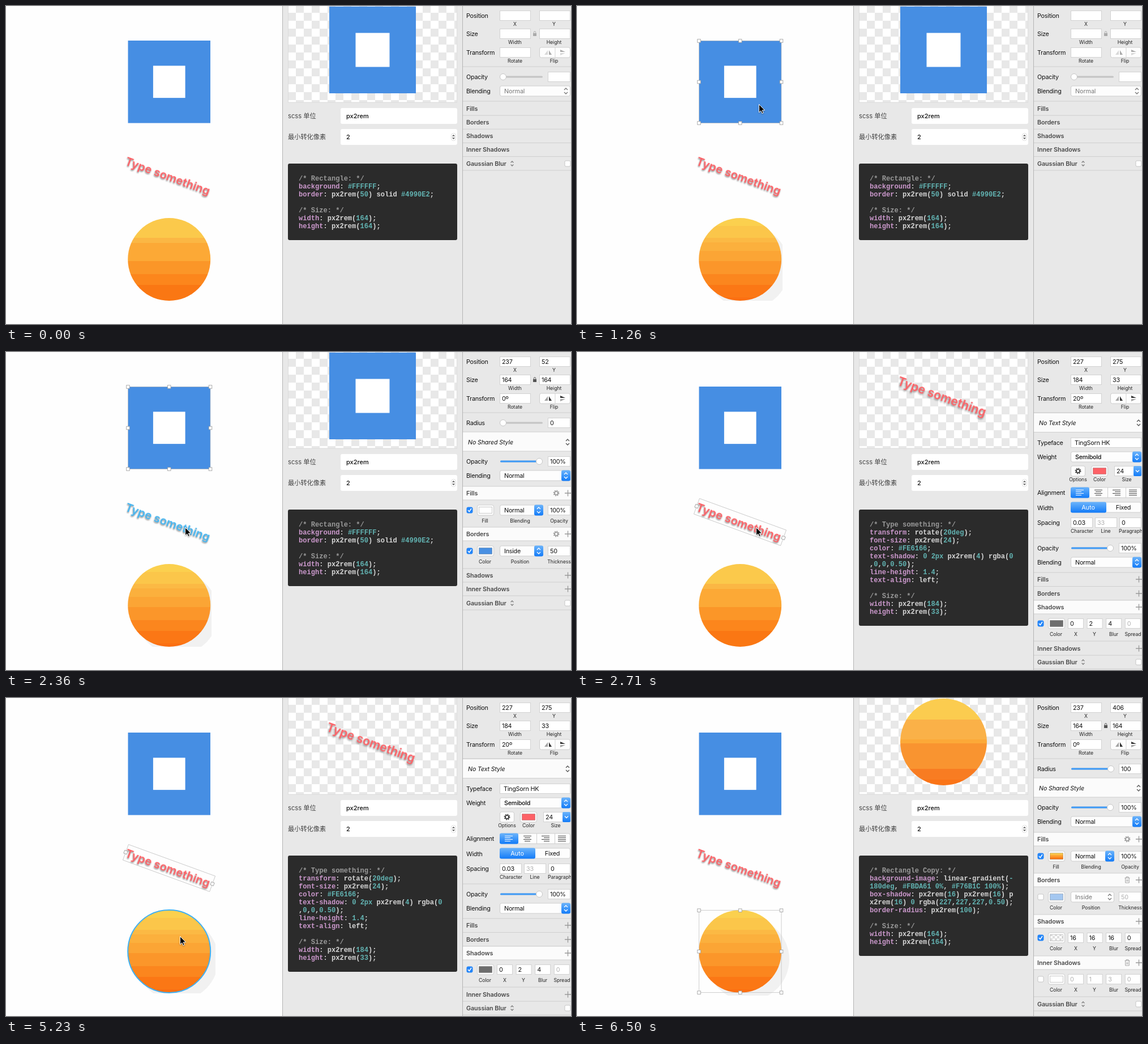
These frames come from a looping animation (998 px wide and 561 px high, 7.41 s). An HTML page:

```html
<!DOCTYPE html>
<html lang="en">
<head>
<meta charset="utf-8">
<title>Style inspector</title>
<style>
html, body { margin: 0; width: 100%; height: 100%; overflow: hidden; background: #fefefe; }
svg { display: block; }
text { font-family: Inter, "Noto Sans CJK SC", "Noto Sans CJK", sans-serif; white-space: pre; }
.l { font-size: 10.8px; letter-spacing: -.25px; fill: #111; }
.s { font-size: 8.7px; letter-spacing: -.05px; fill: #222; text-anchor: middle; }
.b { font-size: 10.8px; letter-spacing: -.1px; font-weight: 600; fill: #4a4a4a; }
.i { font-size: 10.6px; letter-spacing: -.1px; font-style: italic; fill: #111; }
.d { font-size: 10.8px; letter-spacing: -.25px; fill: #b0b0b0; }
.g { font-size: 10.8px; letter-spacing: -.1px; fill: #777; }
.w { font-size: 10.8px; fill: #fff; text-anchor: middle; }
.c { font-size: 10.8px; letter-spacing: -.2px; fill: #111; text-anchor: middle; }
.m { font-size: 11.2px; fill: #444; }
.v { font-size: 11px; font-weight: 500; fill: #111; }
.code { font: bold 12.07px "Liberation Mono", monospace; fill: #d6d6d6; }
.sample { font-size: 20.3px; font-weight: 600; filter: drop-shadow(0 2px 1.3px rgba(0,0,0,.45)); }
</style>
</head>
<body>
<svg id="stage" width="998" height="561" viewBox="0 0 998 561"></svg>
<script>
const LOOP = 7410;
const stage = document.getElementById('stage');
const layers = [];

// Drawing helpers: each returns SVG markup
const rect = (x, y, w, h, fill, more = '') =>
  `<rect x="${x}" y="${y}" width="${w}" height="${h}" fill="${fill}" ${more}/>`;
const path = (d, color, width = 1, more = '') =>
  `<path d="${d}" fill="none" stroke="${color}" stroke-width="${width}" ${more}/>`;
const text = (x, y, s, cls = 'l') => `<text class="${cls}" x="${x}" y="${y}" dy=".36em">${s}</text>`;
const line = y => rect(807, y - .5, 191, 1, '#cfcfcf');
const whiteRow = (y, h) => rect(807, y, 191, h, '#fbfbfb') + line(y) + line(y + h);
const bands = (id, top, bottom, stops) => {
  const marks = stops.map(([y, color], i) => {
    const end = i + 1 < stops.length ? stops[i + 1][0] : bottom;
    return [y, end].map(v => `<stop offset="${(v - top) / (bottom - top)}" stop-color="${color}"/>`).join('');
  });
  return `<linearGradient id="${id}" x2="0" y2="1">${marks.join('')}</linearGradient>`;
};

// Panel controls, positioned by vertical centre
const field = (x, y, w, s = '', cls = 'l') =>
  rect(x + .5, y - 8.5, w - 1, 17, '#fff', 'stroke="#d2d2d2"') + text(x + 4, y, s, cls);
const arrows = (x, y, color, k = 1) =>
  path(`M${x - 3 * k} ${y - 2 * k}l${3 * k} ${-3 * k} ${3 * k} ${3 * k}M${x - 3 * k} ${y + 2 * k}l${3 * k} ${3 * k} ${3 * k} ${-3 * k}`, color, 1.3);
const button = (x, y, w) => rect(x + .5, y - 9, w - 1, 18, '#fdfdfd', 'rx="3" stroke="#cdcdcd"');
const popup = (x, y, w, s, on = true) => button(x, y, w) + text(x + 8, y, s, on ? 'l' : 'g') +
  (on ? rect(x + w - 16, y - 9.5, 16, 19, 'url(#blue)', 'rx="3"') : '') +
  arrows(x + w - 8, y, on ? '#fff' : '#777');
const slider = (y, knob, on) => rect(873, y - 1.5, 75, 3, '#c4c4c4', 'rx="1.5"') +
  (on ? rect(873, y - 1.5, knob - 873, 3, '#3f9bf8', 'rx="1.5"') : '') +
  `<circle cx="${knob}" cy="${y}" r="5.5" fill="#fff" stroke="#c6c6c6"/>`;
const check = (x, y, on) => rect(x - 5, y - 5, 10, 10, on ? '#2385f8' : '#fff', `rx="2" stroke="${on ? '#2385f8' : '#c6c6c6'}"`) +
  (on ? path(`M${x - 3} ${y}l2.3 2.6L${x + 3} ${y - 3}`, '#fff', 1.5) : '');
const swatch = (y, fill, x = 832) => button(x, y, 30) + rect(x + 3.5, y - 5.5, 23, 11, fill, 'stroke="#0003"');
const gear = (x, y, color) => `<g fill="none" stroke="${color}"><circle cx="${x}" cy="${y}" r="3" stroke-width="1.7"/>
  <circle cx="${x}" cy="${y}" r="4.6" stroke-width="1.7" stroke-dasharray="1.8 1.81"/></g>`;
const plus = y => path(`M987 ${y}h11M992.5 ${y - 5.5}v11`, '#999', 1.3);
const trash = y => path(`M967.5 ${y - 3.5}h9M970 ${y - 4}v-1.5h4V${y - 4}M968.7 ${y - 3}v8h6.6v-8M971 ${y - 1}v4M973 ${y - 1}v4`, '#a5a5a5');
const title = (y, s, icons = '', active = false) =>
  (active ? whiteRow(y - 12, 24) : line(y + 12)) + text(813, y, s, 'b') + icons;
const blur = y => title(y, 'Gaussian Blur', arrows(894, y, '#777', .8) + check(992, y, false));
const opacity = (y, on = true) => text(813, y, 'Opacity') + slider(y, on ? 942 : 878, on) + field(957, y, 40, on ? '100%' : '');
const blending = (y, on = true) => text(813, y, 'Blending') + popup(872, y, 125, 'Normal', on);
const labels = (y, names, xs) => names.map((s, i) => text(xs[i], y, s, 's')).join('');
const shadowRow = (y, fill, values, on) => check(819, y, on) + swatch(y, fill) +
  values.map((v, i) => field(867 + 33.6 * i, y, 28, v, !on || v === '0' && i === 3 && fill === '#6e6e6e' ? 'd' : 'l')).join('') +
  labels(y + 18.5, ['Color', 'X', 'Y', 'Blur', 'Spread'], [846, 881, 914, 948, 982]);
const paintRow = (y, fill, mode, amount, names, on = true) => check(819, y, on) + swatch(y, fill) +
  popup(872, y, 77, mode, on) + field(957, y, 40, amount, on ? 'l' : 'd') + labels(y + 18.5, names, [846, 908, 977]);

function header(values = ['', '', '', '', ''], lock = '#555') {
  const [x, y, w, h, angle] = values, flip = angle ? '#333' : '#aaa';
  return text(813, 17, 'Position') + field(872, 17, 55, x) + field(942, 17, 55, y) +
    text(813, 49, 'Size') + field(872, 49, 55, w) + field(942, 49, 55, h) +
    (lock ? rect(931, 48, 6, 5, lock) + path('M932.3 48v-1.5a1.7 1.7 0 0 1 3.4 0V48', lock) : '') +
    text(813, 82, 'Transform') + field(872, 82, 55, angle) + button(942, 82, 55) + rect(969.5, 73, 1, 18, '#d5d5d5') +
    `<path d="M957 78v8h-6zM979 83h9l-9 4z" fill="${flip}" opacity=".45"/><path d="M959 78v8h5zM979 81h9l-9-4z" fill="${flip}"/>` +
    labels(32, ['X', 'Y'], [899, 968]) + labels(64, ['Width', 'Height'], [899, 968]) +
    labels(97, ['Rotate', 'Flip'], [899, 968]) + line(107);
}

const shapeControls = (round) => text(813, 125, 'Radius') + slider(125, round ? 943 : 878, round) +
  field(957, 125, 40, round ? '100' : '0') + whiteRow(141, 34) + text(816, 159, 'No Shared Style', 'i') +
  arrows(992, 159, '#555') + opacity(193) + blending(218) +
  title(249, 'Fills', gear(972, 249, '#999') + plus(249), true) +
  paintRow(279, round ? 'url(#coarse)' : '#fff', 'Normal', '100%', ['Fill', 'Blending', 'Opacity']) +
  title(321, 'Borders', (round ? trash(321) : gear(972, 321, '#999')) + plus(321), true) +
  paintRow(351, round ? '#a4c7f0' : '#4990e2', 'Inside', '50', ['Color', 'Position', 'Thickness'], !round);

const emptyPanel = header(undefined, '#aaa') + opacity(125, false) + blending(150, false) + line(168) +
  ['Fills', 'Borders', 'Shadows', 'Inner Shadows'].map((s, i) => title(181 + 24.2 * i, s)).join('') + blur(278);

const squarePanel = header(['237', '52', '164', '164', '0º']) + shapeControls(false) + line(382) +
  title(394, 'Shadows', plus(394)) + title(418, 'Inner Shadows', plus(418)) + blur(443);

const circlePanel = shapeControls(true) + title(394, 'Shadows', plus(394), true) +
  shadowRow(423, 'url(#tiny)', ['16', '16', '16', '0'], true) +
  title(467, 'Inner Shadows', trash(467) + plus(467), true) +
  shadowRow(496, '#fff', ['0', '1', '3', '0'], false) + line(527) + blur(540);

const alignIcon = (x, shift, short, color) => [0, 1, 2, 3].map(i =>
  rect(x - 7 + (i % 2 ? shift : 0), 243 + 3 * i, i % 2 ? short : 14, 1, color)).join('');
const blueCap = (x, y, w) => rect(x, y - 9.5, w, 19, 'url(#blue)', 'rx="3"');

const textPanel = header(['227', '275', '184', '33', '20º'], '') +
  whiteRow(107.5, 34) + text(816, 125, 'No Text Style', 'i') + arrows(992, 125, '#555') +
  text(813, 160, 'Typeface') + field(872, 160, 125) + text(879, 160, 'TingSorn HK') +
  text(813, 185, 'Weight') + popup(872, 185, 125, '<tspan font-weight="500">Semibold</tspan>') +
  button(872, 210, 26) + gear(885, 210, '#333') + swatch(210, '#fe6166', 908) + field(949, 210, 48, '24') +
  rect(983, 201, 14, 18, 'url(#blue)', 'rx="2"') + path('M987 208.5l3 3 3-3', '#fff', 1.3) +
  labels(225, ['Options', 'Color', 'Size'], [885, 923, 971]) +
  text(813, 248, 'Alignment') + button(872, 248, 125) + blueCap(872, 248, 33) +
  rect(937, 239, 1, 18, '#d0d0d0') + rect(969, 239, 1, 18, '#d0d0d0') +
  alignIcon(888, 0, 10, '#fff') + alignIcon(921, 2, 10, '#444') + alignIcon(953, 4, 10, '#444') + alignIcon(982, 0, 14, '#444') +
  text(813, 275, 'Width') + button(872, 274, 125) + blueCap(872, 274, 63) + text(903, 274, 'Auto', 'w') + text(965, 274, 'Fixed', 'c') +
  text(813, 301, 'Spacing') + field(872, 301, 39, '0.03') + field(915, 301, 39, '33', 'd') + field(958, 301, 39, '0') +
  labels(316, ['Character', 'Line', 'Paragraph'], [892, 934, 978]) + line(328) +
  opacity(346) + blending(371) + line(389) + title(401.5, 'Fills', plus(401)) + title(426, 'Borders', plus(426)) +
  title(450, 'Shadows', plus(450), true) + shadowRow(479, '#6e6e6e', ['0', '2', '4', '0'], true) + line(510) +
  title(523, 'Inner Shadows', plus(523)) + blur(547);

// Code block with simple highlighting
function paintLine(s) {
  if (s.startsWith('/*')) return `<tspan fill="#999">${s}</tspan>`;
  const [, property = '', rest] = s.match(/^([a-z-]+(?=: ))?(.*)$/);
  return `<tspan fill="#cc99cd">${property}</tspan>` +
    rest.replace(/#\w+|\b\d[\d.]*(?:deg|px|%)?|-$/g, '<tspan fill="#62b3b2">$&</tspan>');
}
function code(source) {
  const lines = source.split('\n');
  return rect(498, 278, 299, 37 + 14 * lines.length, '#2b2b2b', 'rx="3"') +
    lines.map((s, i) => `<text class="code" x="517" y="${307.5 + 14 * i}">${paintLine(s)}</text>`).join('');
}

// Artwork
const square = (x, y, size, inset, hole) => rect(x, y, size, size, '#468ee3') + rect(x + inset, y + inset, hole, hole, '#fff');
const disc = (fill, cx = 288.2, cy = 447, r = 73) => `<circle cx="${cx}" cy="${cy}" r="${r}" fill="${fill}"/>`;
const sample = (x, y, color, scale = 1) => `<g transform="translate(${x} ${y}) rotate(20) scale(${scale})">
  <text class="sample" x="-81" y="7.6" fill="${color}">Type something</text></g>`;
const handle = (x, y) => rect(x - 2.8, y - 2.8, 5.6, 5.6, '#fff', 'stroke="#999" stroke-width=".8"');
const selection = top => rect(215.5, top, 145.5, 145, 'none', 'stroke="#bbb" stroke-width=".7"') +
  [0, 1, 2, 3, 4, 5, 6, 7, 8].filter(i => i !== 4)
    .map(i => handle(215.5 + 72.75 * (i % 3), top + 72.5 * Math.floor(i / 3))).join('');
const textSelection = `<g transform="translate(288 300) rotate(20)">
  ${rect(-81.5, -14.6, 163, 29.2, 'none', 'stroke="#bbb" stroke-width=".7"')}${handle(-81.5, 0)}${handle(81.5, 0)}</g>`;
const castShadow = (right, bottom) =>
  `<svg width="${right}" height="${bottom}">${disc('#f1f1f1', 302, 461)}</svg>`;

// A layer is visible during its [start, end) spans
function layer(markup, ...spans) {
  const g = document.createElementNS('http://www.w3.org/2000/svg', 'g');
  g.innerHTML = markup;
  stage.append(g);
  if (spans.length) layers.push({ g, spans });
  return g;
}

layer(`<defs>
  <linearGradient id="blue" x2="0" y2="1"><stop stop-color="#6cb4fb"/><stop offset="1" stop-color="#127bf8"/></linearGradient>
  <pattern id="checker" width="28" height="28" patternUnits="userSpaceOnUse" patternTransform="translate(498 -2)">
    ${rect(0, 0, 28, 28, '#fff')}${rect(14, 0, 14, 14, '#e8e8e8')}${rect(0, 14, 14, 14, '#e8e8e8')}</pattern>
  <pattern id="tiny" width="8" height="8" patternUnits="userSpaceOnUse">
    ${rect(0, 0, 8, 8, '#fff')}${rect(4, 0, 4, 4, '#ddd')}${rect(0, 4, 4, 4, '#ddd')}</pattern>
  ${bands('coarse', 374, 520, [[374, '#fbc94b'], [409, '#fbb744'], [418, '#fca936'], [450, '#fb9628'], [473, '#fc861c'], [492, '#fa7713']])}
  ${bands('fine', 374, 520, [[374, '#fbd04e'], [388, '#fbc64a'], [409, '#fbb944'], [417, '#fbb03d'], [432, '#fba535'],
    [450, '#fb962a'], [473, '#fb861e'], [492, '#fb7715'], [514, '#fb6f12']])}
  ${bands('preview', 1, 154, [[1, '#fbcc4f'], [38, '#fab148'], [73, '#fca938'], [80, '#f99430'], [125, '#f87c22'], [144, '#fa7417']])}
</defs>`);

// Canvas
layer(square(215.5, 61, 145.5, 44.4, 56.7));
layer(sample(288, 300, '#fe6166'), [0, 2010], [2710, LOOP]);
layer(sample(288, 300, '#45b6f2'), [2010, 2710]);
layer(castShadow(363, 520), [990, 2710], [3850, 5230]);
layer(castShadow(370, 521), [5230, 5350]);
layer(castShadow(375, 525), [6500, LOOP]);
layer(disc('url(#coarse)'), [0, 990], [2710, 3850], [5350, 6500]);
layer(disc('url(#fine)'), [990, 2710], [3850, 5350], [6500, LOOP]);
layer(rect(215.5, 61, 145.5, 145.5, 'none', 'stroke="#3fb0f4" stroke-width="2"'), [990, 1260]);
layer('<circle cx="288.2" cy="447" r="73" fill="none" stroke="#3fb0f4" stroke-width="2"/>', [4550, 5350]);
layer(selection(61.5), [1260, 2710]);
layer(textSelection, [2710, 5350]);
layer(selection(374.7), [5350, LOOP]);

// Preview and code column
layer(rect(488, 0, 510, 561, '#e8e8e8') + rect(488, 0, 1, 561, '#b4b4b4') + rect(806, 0, 1, 561, '#b4b4b4') +
  rect(498.5, -1, 298, 171, 'url(#checker)', 'stroke="#dcdcdc"') +
  text(498, 194, 'scss 单位', 'm') + text(498, 231, '最小转化像素', 'm') +
  rect(591, 180, 206, 28, '#fff', 'rx="3"') + rect(591, 217, 206, 28, '#fff', 'rx="3"') +
  text(601, 194, 'px2rem', 'v') + text(601, 231, '2', 'v') +
  rect(786.5, 224.5, 8, 13, '#fff', 'rx="4" stroke="#ddd"') + arrows(790.5, 231, '#555', .6));
layer(square(571, 1, 153, 46.5, 60) +
  code(`/* Rectangle: */
background: #FFFFFF;
border: px2rem(50) solid #4990E2;

/* Size: */
width: px2rem(164);
height: px2rem(164);`), [0, 2710]);
layer(sample(647, 79, '#fe6166', 1.045) +
  code(`/* Type something: */
transform: rotate(20deg);
font-size: px2rem(24);
color: #FE6166;
text-shadow: 0 2px px2rem(4) rgba(0
,0,0,0.50);
line-height: 1.4;
text-align: left;

/* Size: */
width: px2rem(184);
height: px2rem(33);`), [2710, 5350]);
layer(disc('url(#preview)', 647.5, 77.5, 76.5) +
  code(`/* Rectangle Copy: */
background-image: linear-gradient(-
180deg, #FBDA61 0%, #F76B1C 100%);
box-shadow: px2rem(16) px2rem(16) p
x2rem(16) 0 rgba(227,227,227,0.50);
border-radius: px2rem(100);

/* Size: */
width: px2rem(164);
height: px2rem(164);`), [5350, LOOP]);

// Inspector column
layer(emptyPanel, [0, 1500]);
layer(squarePanel, [1500, 2710]);
layer(textPanel, [2710, 5350]);
layer(circlePanel, [5350, LOOP]);
layer(header(['227', '275', '184', '33', '0º']), [5350, 5470]);
layer(header(['237', '406', '164', '164', '0º']), [5470, LOOP]);

// Pointer: it jumps between [time, x, y] stops
const pointer = layer('<path d="M.5 .5v14.3l3.3-3 2.2 4.8 2.3-1-2.1-4.7h4.5z" stroke="#fff" stroke-linejoin="round" style="filter:drop-shadow(0 1px 1px #0005)"/>',
  [390, 6230]);
const stops = [
  [390, 629, 556], [570, 480, 390], [675, 352, 215], [780, 321, 173],
  [1790, 321, 190], [1900, 319, 245], [2010, 317, 295], [2120, 316, 309],
  [4330, 315, 325], [4440, 312, 370], [4550, 308, 410], [4660, 307, 420],
  [6120, 392, 478]
];

function draw(now) {
  const t = now % LOOP;
  for (const { g, spans } of layers)
    g.style.display = spans.some(([start, end]) => t >= start && t < end) ? '' : 'none';
  const [, x, y] = stops.filter(stop => stop[0] <= t).pop() || stops[0];
  pointer.setAttribute('transform', `translate(${x} ${y})`);
}

const began = performance.now();
function tick() {
  draw(performance.now() - began);
  requestAnimationFrame(tick);
}
tick();
</script>
</body>
</html>
```
